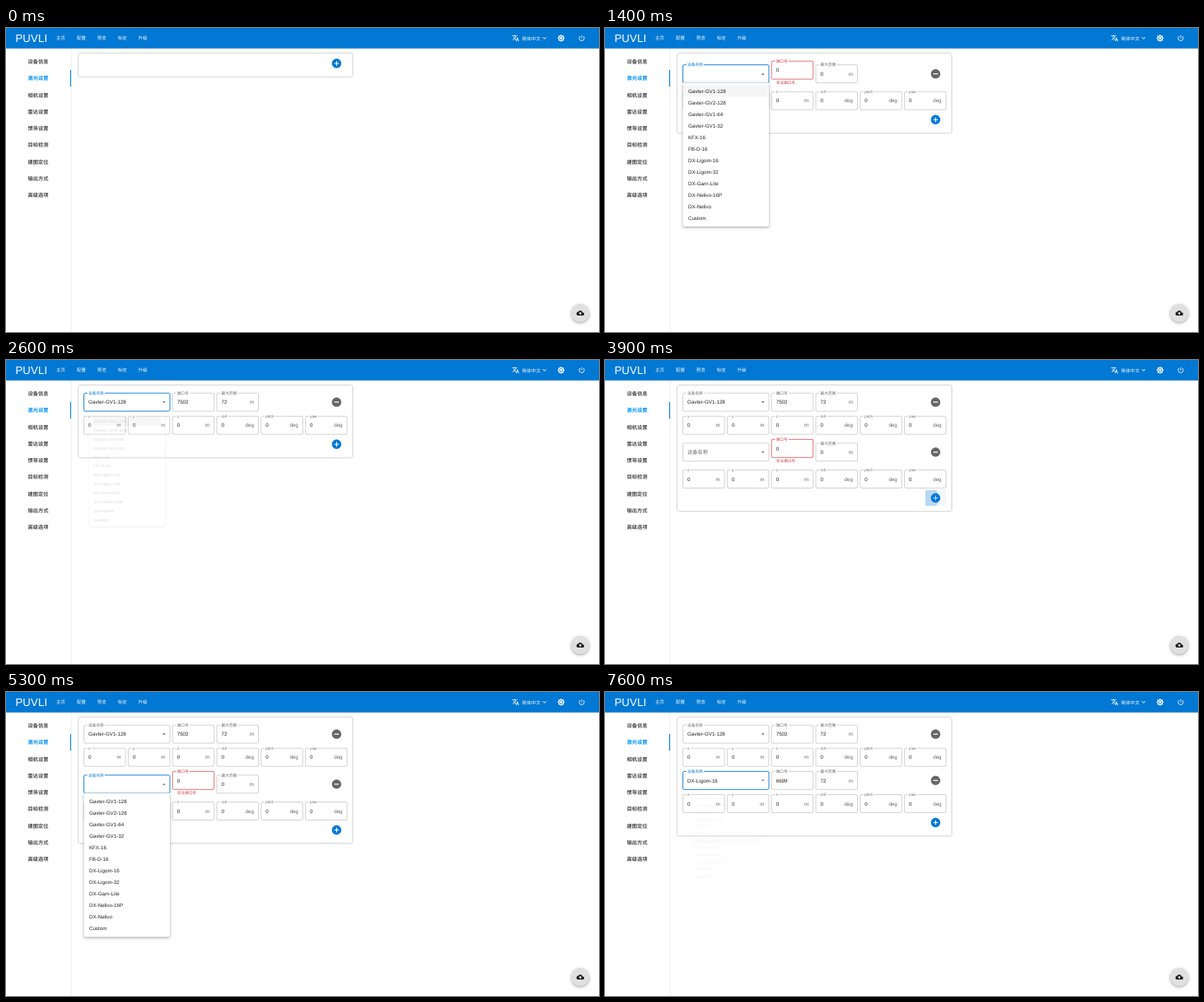
An HTML page for the animation above (8000 ms loop, 720x369 px).

```html
<!DOCTYPE html>
<html lang="zh-CN">
<head>
<meta charset="utf-8">
<title>激光设置</title>
<style>
html, body { margin: 0; width: 100%; height: 100%; overflow: hidden; background: #fff; }
svg { display: block; width: 720px; height: 369px; }
text { font-family: "Liberation Sans", "Noto Sans CJK SC", "Noto Sans CJK", sans-serif; text-rendering: geometricPrecision; white-space: pre; }
.notch { paint-order: stroke; stroke: #fff; stroke-width: 3px; stroke-linejoin: round; }
.bar { filter: drop-shadow(0 .8px .9px rgba(0,0,0,.3)); }
.card { filter: drop-shadow(0 .9px .8px rgba(0,0,0,.28)) drop-shadow(0 .3px 1.2px rgba(0,0,0,.14)); }
.float { filter: drop-shadow(0 1.6px 1.3px rgba(0,0,0,.24)) drop-shadow(0 1px 2.4px rgba(0,0,0,.16)); }
</style>
</head>
<body>
<svg id="stage" viewBox="0 0 720 369"></svg>
<script>
const LOOP = 8000, STEP = 100;
const BLUE = '#0078d4', RED = '#d9363e';
const INK = 'rgba(0,0,0,.87)', SOFT = 'rgba(0,0,0,.6)', LINE = 'rgba(0,0,0,.3)';
const ROW = 28.1, ERROR_EXTRA = 9, TOP = 40.2, FIELD_H = 21.9, COL = 53.8, LEFT = 94.6;
const NARROW = 50.5, WIDE = 104.4, ITEM_H = 14.05, MENU_PAD = 3.1;

const DEVICES = ['Gavter-GV1-128', 'Gavter-GV2-128', 'Gavter-GV1-64', 'Gavter-GV1-32', 'KFX-16', 'FB-D-16',
  'DX-Ligom-16', 'DX-Ligom-32', 'DX-Garn-Lite', 'DX-Nelivo-16P', 'DX-Nelivo', 'Custom'];

// Each row: button press, menu opening, choice made, menu starting to close, blur.
const ROWS = [
  { press: 420, added: 520, open: 1070, chosen: 2390, close: 2407, blur: 3700, item: 0, port: 7502, hover: 1e9 },
  { press: 3700, added: 3800, open: 4970, chosen: 7350, close: 7350, blur: 1e9, item: 6, port: 6699, hover: 4400 }
];

const DISC = 'M12 2C6.48 2 2 6.48 2 12s4.48 10 10 10 10-4.48 10-10S17.52 2 12 2z';
const ICONS = {
  add: DISC + 'm5 11h-4v4h-2v-4H7v-2h4V7h2v4h4v2z',
  remove: DISC + 'm5 11H7v-2h10v2z',
  language: 'M12.87 15.07l-2.54-2.51.03-.03c1.74-1.94 2.98-4.17 3.71-6.53H17V4h-7V2H8v2H1v1.99h11.17C11.5 7.92 10.44 9.75 9 11.35 8.07 10.32 7.3 9.19 6.69 8h-2c.73 1.63 1.73 3.17 2.98 4.56l-5.09 5.02L4 19l5-5 3.11 3.11.76-2.04zM18.5 10h-2L12 22h2l1.12-3h4.75L21 22h2l-4.5-12zm-2.62 7l1.62-4.33L19.12 17h-3.24z',
  chevron: 'M16.59 8.59L12 13.17 7.41 8.59 6 10l6 6 6-6z',
  theme: 'M20 8.69V4h-4.69L12 .69 8.69 4H4v4.69L.69 12 4 15.31V20h4.69L12 23.31 15.31 20H20v-4.69L23.31 12 20 8.69zM12 18c-3.31 0-6-2.69-6-6s2.69-6 6-6 6 2.69 6 6-2.69 6-6 6zm0-10c-2.21 0-4 1.79-4 4s1.79 4 4 4 4-1.79 4-4-1.79-4-4-4z',
  power: 'M13 3h-2v10h2V3zm4.83 2.17l-1.42 1.42C17.99 7.86 19 9.81 19 12c0 3.87-3.13 7-7 7s-7-3.13-7-7c0-2.19 1.01-4.14 2.58-5.42L6.17 5.17C4.23 6.82 3 9.26 3 12c0 4.97 4.03 9 9 9s9-4.03 9-9c0-2.74-1.23-5.18-3.17-6.83z',
  upload: 'M19.35 10.04C18.67 6.59 15.64 4 12 4 9.11 4 6.6 5.64 5.35 8.04 2.34 8.36 0 10.91 0 14c0 3.31 2.69 6 6 6h13c2.76 0 5-2.24 5-5 0-2.64-2.05-4.78-4.65-4.96zM14 13v4h-4v-4H7l5-5 5 5h-3z',
  arrow: 'M7 9.5l5 5 5-5z'
};

const clamp = v => Math.max(0, Math.min(1, v));
const lerp = (a, b, p) => a + (b - a) * p;

// Cubic bezier (x1, 0, .2, 1)
function bezier(x, x1) {
  let lo = 0, hi = 1, s = .5;
  x = clamp(x);
  for (let i = 0; i < 24; i++) {
    s = (lo + hi) / 2;
    const bx = 3 * (1 - s) ** 2 * s * x1 + 3 * (1 - s) * s * s * .2 + s ** 3;
    if (bx < x) lo = s; else hi = s;
  }
  return 3 * (1 - s) * s * s + s ** 3;
}
const ease = x => bezier(x, .4);
const easeOut = x => bezier(x, 0);

const rect = (x, y, w, h, attrs) => `<rect x="${x}" y="${y}" width="${w}" height="${h}" ${attrs}/>`;
const icon = (name, x, y, fill, scale = .39, turn = 0) =>
  `<path d="${ICONS[name]}" fill="${fill}" transform="translate(${x} ${y}) rotate(${turn}) scale(${scale}) translate(-12 -12)"/>`;

// y is the visual middle of the line.
function label(str, x, y, size, fill, attrs = '') {
  const drop = /[\u4e00-\u9fff]/.test(str) ? .38 : .355;
  return `<text x="${x}" y="${y + size * drop}" font-size="${size}" fill="${fill}" ${attrs}>${str}</text>`;
}

function field(x, y, w, { name, value = '', unit = '', color = LINE, nameColor = SOFT, weight = .6, shrink = 1 }) {
  const mid = y + FIELD_H / 2;
  return rect(x, y, w, FIELD_H, `rx="1.6" fill="none" stroke="${color}" stroke-width="${weight}"`)
    + label(name, x + 5.5, lerp(mid, y, shrink), lerp(6.24, 4.68, shrink), nameColor, shrink > .3 ? 'class="notch"' : '')
    + label(String(value), x + 5.5, mid, 6.24, INK)
    + label(unit, x + w - 5.5, mid, 6.24, SOFT, 'text-anchor="end"');
}

function deviceRow(row, y, t) {
  const done = t >= row.chosen, shift = done ? 0 : ERROR_EXTRA / 2;
  const focused = t >= row.open && t < row.blur;
  const hovered = t >= row.hover && !focused;
  const opened = focused && !done;
  const mid = y + shift + FIELD_H / 2;
  const lower = y + ROW + shift * 2;
  const axes = ['x', 'y', 'z', 'roll', 'pitch', 'yaw'];
  return field(LEFT, y + shift, WIDE, {
      name: '设备名称', value: done ? DEVICES[row.item] : '',
      color: focused ? BLUE : hovered ? INK : LINE, nameColor: focused ? BLUE : SOFT,
      weight: focused ? .9 : .6, shrink: easeOut((t - row.open) / 200)
    })
    + icon('arrow', 191.7, mid, SOFT, .39, opened ? 180 : 0)
    + field(LEFT + COL * 2, y, NARROW, done
      ? { name: '端口号', value: row.port }
      : { name: '端口号', value: 0, color: RED, nameColor: RED, weight: .7 })
    + (done ? '' : label('非法端口号', LEFT + COL * 2 + 5.5, y + 26.2, 4.68, RED))
    + field(LEFT + COL * 3, y + shift, NARROW, { name: '最大范围', value: done ? 72 : 0, unit: 'm' })
    + icon('remove', 401.4, mid, SOFT, .569)
    + axes.map((name, i) => field(LEFT + COL * i, lower, NARROW, { name, value: 0, unit: i < 3 ? 'm' : 'deg' })).join('');
}

function addButton(y, t) {
  const box = [389, y - 9.5, 25, 19];
  let out = `<clipPath id="button">${rect(...box, 'rx="1.6"')}</clipPath>`;
  for (const { press } of ROWS) {
    const age = t - press;
    if (age < 0 || age >= 480) continue;
    const fade = 1 - clamp((age - 200) / 280);
    out += rect(...box, `rx="1.6" fill="${BLUE}" opacity="${.05 * fade}"`)
      + `<circle cx="391" cy="${y}" r="${27 * ease(age / 550)}" fill="${BLUE}" opacity="${.25 * fade}" clip-path="url(#button)"/>`;
  }
  return out + icon('add', 401.4, y, BLUE, .569);
}

function menu(row, top, t) {
  const closing = t - row.close;
  if (t < row.open || closing > 346) return '';
  const grown = closing < 0 ? ease((t - row.open) / 230) : 1 - ease((closing - 115) / 230);
  const opacity = closing < 0 ? ease((t - row.open) / 346) : 1 - ease(closing / 346);
  const sx = lerp(.75, 1, grown), cx = LEFT + WIDE / 2;
  const height = MENU_PAD * 2 + ITEM_H * DEVICES.length;
  const itemY = top + MENU_PAD + ITEM_H * row.item;
  const pressed = t - row.close + 107;
  const lit = row.item === 0 || t >= 7300;
  let out = rect(LEFT, top, WIDE, height, 'rx="1.6" fill="#fff" class="float"');
  if (lit) out += rect(LEFT, itemY, WIDE, ITEM_H, 'fill="#000" opacity=".04"');
  if (lit && pressed >= 0)
    out += `<clipPath id="item">${rect(LEFT, itemY, WIDE, ITEM_H, '')}</clipPath>`
      + `<circle cx="146.5" cy="${itemY + ITEM_H / 2 + .5}" r="${8 + Math.max(0, pressed - 57) * .16}" opacity=".14" clip-path="url(#item)"/>`;
  out += DEVICES.map((name, i) => label(name, 100.9, top + MENU_PAD + ITEM_H * (i + .5), 6.24, INK)).join('');
  return `<g opacity="${opacity}" transform="translate(${cx} ${top}) scale(${sx} ${sx * sx}) translate(${-cx} ${-top})">${out}</g>`;
}

function frame() {
  const side = ['设备信息', '激光设置', '相机设置', '雷达设置', '惯导设置', '目标检测', '建图定位', '输出方式', '高级选项'];
  const nav = ['主页', '配置', '预览', '标定', '升级'];
  return rect(0, 0, 720, 369, 'fill="#fff"')
    + rect(78.8, 25, .5, 344, 'fill="#dedede"')
    + side.map((s, i) => label(s, 39.1, 40.7 + 20.25 * i, 6.24, i === 1 ? '#0091f5' : '#4a4a4a', 'text-anchor="middle" font-weight="700"')).join('')
    + rect(77.9, 51, 1.1, 20.2, 'fill="#0086e0"')
    + rect(0, 0, 720, 24.7, `fill="${BLUE}" class="bar"`)
    + label('PUVLI', 11.4, 12.2, 13.26, '#fff', 'letter-spacing=".1"')
    + nav.map((s, i) => label(s, 61 + 24.9 * i, 12.4, 5.5, '#fff')).join('')
    + icon('language', 618.7, 12.3, '#fff')
    + label('简体中文', 626.6, 12.4, 5.6, '#fff')
    + icon('chevron', 653.9, 12.3, '#fff')
    + icon('theme', 674, 12.3, '#fff')
    + icon('power', 699, 12.3, '#fff')
    + '<circle cx="697.3" cy="346" r="10.9" fill="#e0e0e0" class="float"/>'
    + icon('upload', 697.3, 346, INK);
}

function scene(t) {
  let y = TOP, rows = '', menus = '';
  ROWS.forEach((row, i) => {
    if (t < row.added) return;
    rows += deviceRow(row, y, t);
    menus += menu(row, TOP + ROW * 2 * i + 26, t);
    y += ROW * 2 + (t < row.chosen ? ERROR_EXTRA : 0);
  });
  const buttonY = y === TOP ? 43 : y + 5.9;
  return rect(88.2, 31, 332.3, buttonY + 15.7 - 31, 'rx="1.6" fill="#fff" class="card"')
    + rows + addButton(buttonY, t) + menus;
}

const stage = document.getElementById('stage');
const chrome = frame();
let shown = -1;

function tick(now) {
  const t = Math.min(7600, Math.floor(now % LOOP / STEP) * STEP);
  if (t !== shown) stage.innerHTML = chrome + scene(shown = t);
  requestAnimationFrame(tick);
}
tick(0);
</script>
</body>
</html>
```
